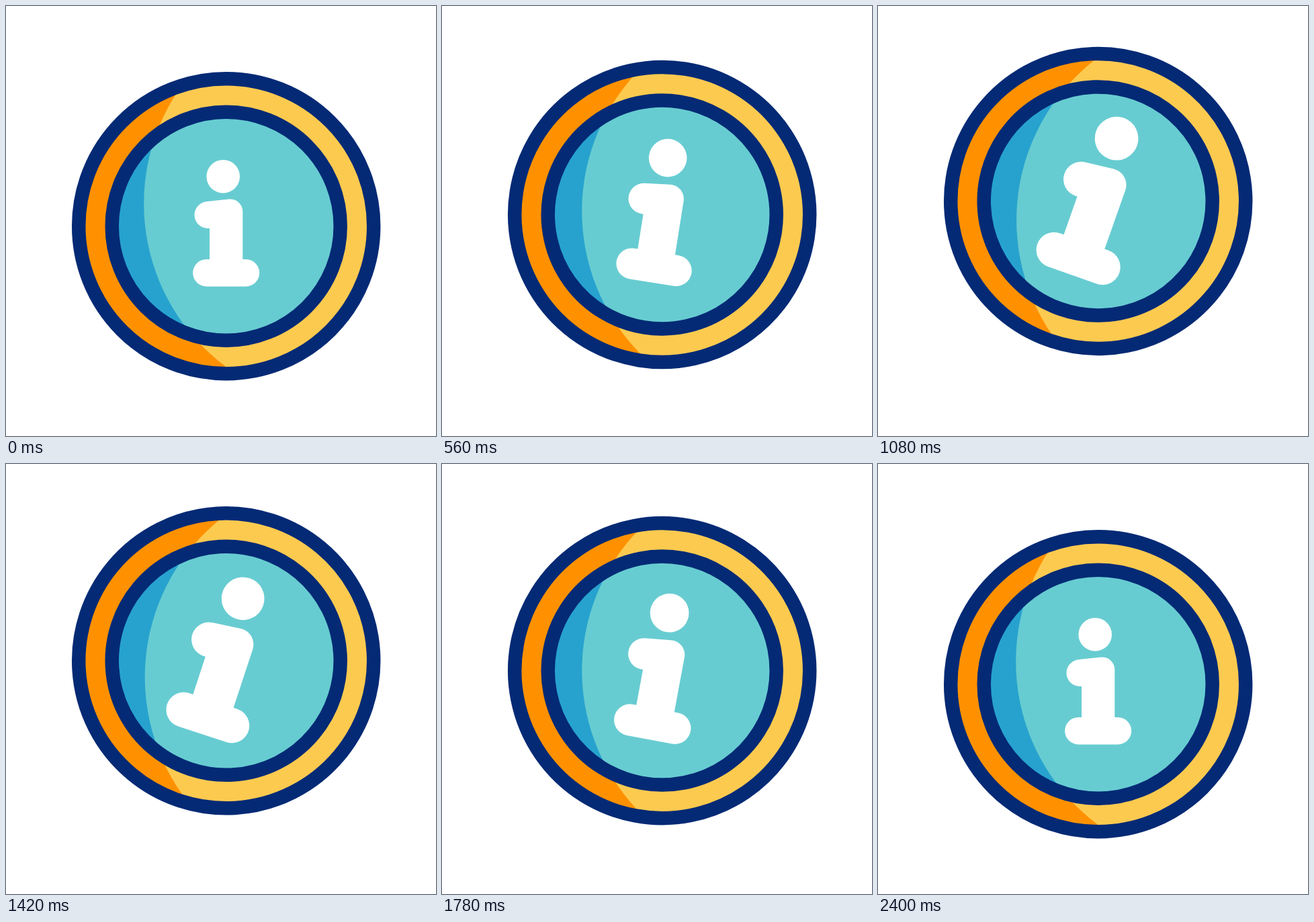
Recreate the animation shown at these times as an HTML page. Size 640 by 640 pixels, loop 2420 ms.

```html
<!DOCTYPE html>
<html lang="en">
<head>
<meta charset="utf-8">
<title>Information badge</title>
<style>
  html, body { margin: 0; height: 100%; overflow: hidden; background: #fff; }
  svg { display: block; width: 100%; height: 100%; }
</style>
</head>
<body>
<svg viewBox="0 0 640 640">
  <defs>
    <clipPath id="rim"><circle r="219.5"/></clipPath>
    <clipPath id="face"><circle r="170"/></clipPath>
  </defs>
  <!-- Everything is drawn around the badge centre -->
  <g id="badge">
    <g id="disc">
      <circle r="219.5" fill="#ff9100"/>
      <g clip-path="url(#rim)"><circle cx="179.5" cy="-33.5" r="302" fill="#fdca50"/></g>
      <circle r="170" fill="#27a2ce"/>
      <g clip-path="url(#face)"><circle cx="179.5" cy="-33.5" r="302" fill="#67ccd1"/></g>
      <g fill="none" stroke="#042a75" stroke-width="20.5">
        <circle r="219.5"/>
        <circle r="170"/>
      </g>
    </g>
    <g id="letter" fill="#fff">
      <g transform="translate(-327.7 -327.7)">
        <circle cx="323.2" cy="253.7" r="24.8"/>
        <path d="M298.5 291.1 L331.7 287.5 A18.6 18.6 0 0 1 352.3 306 V377 H357
          a20.2 20.2 0 0 1 0 40.4 H298.3 a20.2 20.2 0 0 1 0 -40.4 H303 V331 H300.5
          A20 20 0 0 1 298.5 291.1 Z"/>
      </g>
    </g>
  </g>
</svg>
<script>
  const LOOP = 2420, HALF = 1200, STEP = 20;
  const RISE = 38.3, TILT = 20, GROWTH = 0.315;
  const [badge, disc, letter] = ['badge', 'disc', 'letter'].map(id => document.getElementById(id));
  const place = (node, value) => node.setAttribute('transform', value);
  const smooth = x => x * x * (3 - 2 * x);

  function draw(now) {
    const time = Math.floor((now % LOOP) / STEP) * STEP;
    const swing = smooth(1 - Math.abs(time - HALF) / HALF);
    const angle = TILT * swing;
    place(badge, `translate(327.7 ${327.7 - RISE * swing})`);
    place(disc, `rotate(${angle})`);
    place(letter, `translate(-0.3 1.5) rotate(${angle}) scale(${1 + GROWTH * swing}) translate(0.3 -1.5)`);
  }

  const start = performance.now();
  function tick() {
    draw(performance.now() - start);
    requestAnimationFrame(tick);
  }
  tick();
</script>
</body>
</html>
```
